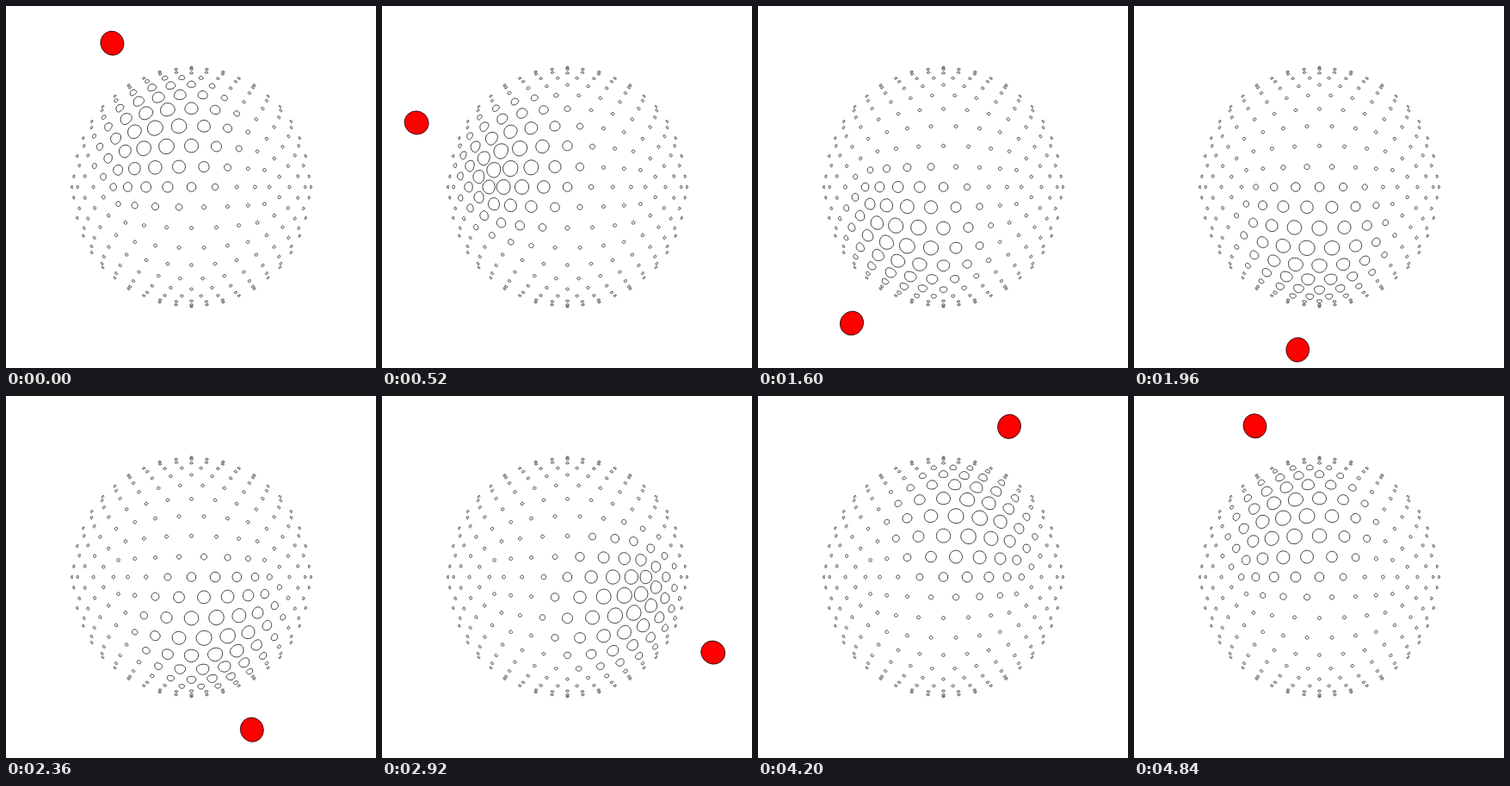
Write an HTML page with a canvas that moves like this. It is 430 by 420 pixels and loops after 4880 ms.

```html
<!DOCTYPE html>
<html>
<head>
<meta charset="utf-8">
<style>
html, body { margin: 0; width: 100%; height: 100%; overflow: hidden; background: #fff; }
canvas { display: block; }
</style>
</head>
<body>
<canvas id="stage" width="430" height="420"></canvas>
<script>
const ctx = document.getElementById('stage').getContext('2d');
const CX = 215.5, CY = 210;
const FOCAL = 507, CAMERA = 3.8;      // unit sphere, camera on the z axis
const EYE = [0, 1e-6, CAMERA];        // tiny offset keeps the centre dome's axes defined
const LOOP = 4880, STEP = 40;
const START = 118.9, SPEED = 73.2;    // degrees, degrees per second
const ORBIT = 0.807, BALL_Z = 1.653;
const DETAIL = 8, SEGMENTS = 32;

const sub = (a, b) => a.map((v, k) => v - b[k]);
const unit = a => a.map(v => v / Math.hypot(...a));
const distance = (a, b) => Math.hypot(...sub(a, b));
const cross = (a, b) => [
  a[1] * b[2] - a[2] * b[1],
  a[2] * b[0] - a[0] * b[2],
  a[0] * b[1] - a[1] * b[0]
];

function project([x, y, z]) {
  const scale = FOCAL / (CAMERA - z);
  return [CX + x * scale, CY - y * scale];
}

// Visible vertices of an icosahedron, subdivided and pushed out to the sphere
function spherePoints() {
  const t = (1 + Math.sqrt(5)) / 2, corners = [], points = new Map();
  for (const s of [-1, 1])
    for (const u of [-t, t]) corners.push([s, 0, u], [u, s, 0], [0, u, s]);
  const adjacent = (a, b) => Math.abs(distance(a, b) - 2) < 0.01;

  corners.forEach((a, ia) => corners.forEach((b, ib) => corners.forEach((c, ic) => {
    if (ia >= ib || ib >= ic || !adjacent(a, b) || !adjacent(b, c) || !adjacent(a, c)) return;
    for (let i = 0; i <= DETAIL; i++)
      for (let j = 0; j <= DETAIL - i; j++) {
        const p = a.map((v, k) => (v * i + b[k] * j + c[k] * (DETAIL - i - j)) / DETAIL);
        const n = unit(p);
        if (n[2] * CAMERA > 1) points.set(p.map(v => Math.round(v * 1000)).join(), n);
      }
  })));
  return [...points.values()].sort((a, b) => a[2] - b[2]);
}

// Each dome carries its sideways axis, its silhouette axis and its base axis
const domes = spherePoints().map(n => {
  const view = unit(sub(EYE, n)), side = unit(cross(n, view));
  return { n, side, outer: cross(view, side), base: cross(n, side) };
});

// Half ball on the surface: round on the outward side, flattened base on the inward side
function drawDome({ n, side, outer, base }, radius) {
  ctx.beginPath();
  for (let i = 0; i < SEGMENTS; i++) {
    const a = i / SEGMENTS * 2 * Math.PI;
    const c = radius * Math.cos(a), s = radius * Math.sin(a);
    const axis = s > 0 ? outer : base;
    ctx.lineTo(...project(n.map((v, k) => v + side[k] * c + axis[k] * s)));
  }
  ctx.closePath();
  ctx.fill();
  ctx.stroke();
}

function draw(time) {
  const angle = (START + SPEED * time / 1000) * Math.PI / 180;
  const ball = [ORBIT * Math.cos(angle), ORBIT * Math.sin(angle), BALL_Z];

  ctx.fillStyle = '#fff';
  ctx.fillRect(0, 0, 430, 420);

  ctx.strokeStyle = '#000';
  ctx.lineWidth = 0.75;
  for (const dome of domes)
    drawDome(dome, Math.max(0.011, 0.15 - 0.1164 * distance(dome.n, ball)));

  ctx.fillStyle = '#f00';
  ctx.beginPath();
  ctx.ellipse(...project(ball), 14.2, 13.4, -angle, 0, 2 * Math.PI);
  ctx.fill();
  ctx.stroke();
}

const begin = performance.now();
function tick() {
  const time = (performance.now() - begin) % LOOP;
  draw(Math.floor(time / STEP) * STEP);
  requestAnimationFrame(tick);
}
tick();
</script>
</body>
</html>
```
